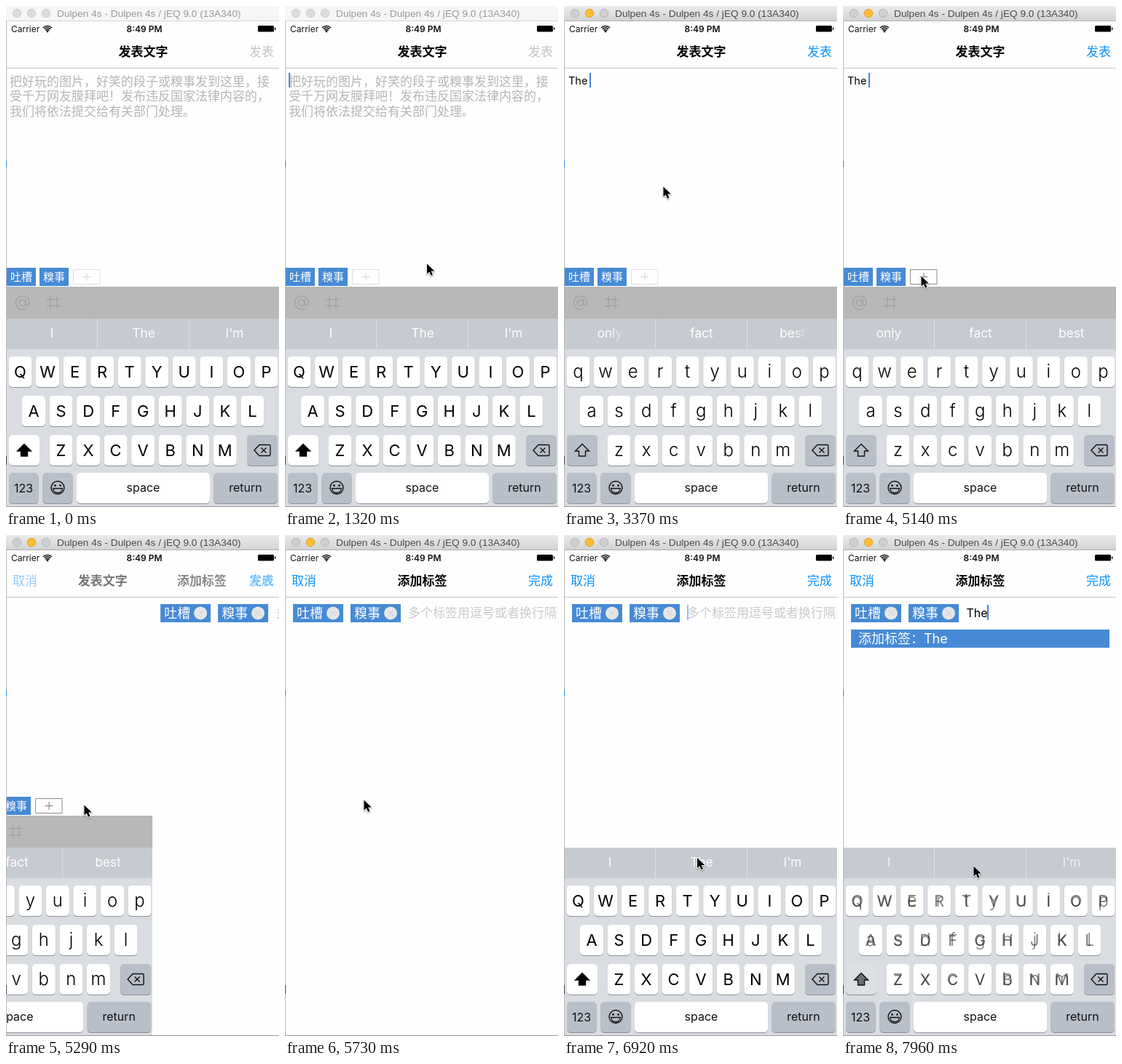
Recreate the animation shown at these times as an HTML page with a canvas. Size 375 px wide and 689 px high, loop 8 s.

```html
<!DOCTYPE html>
<html lang="zh-CN">
<head>
<meta charset="utf-8">
<title>发表文字</title>
<style>
  html, body { margin: 0; width: 100%; height: 100%; overflow: hidden; background: #fff; }
  canvas { display: block; width: 375px; height: 689px; }
</style>
</head>
<body>
<canvas id="stage"></canvas>
<script>
const W = 375, H = 689, LOOP = 8000, TICK = 147.2;
const BLUE = '#468ad5', LINK = '#0b92fb', SPECIAL = '#b9bfc9';
const canvas = document.getElementById('stage');
const ctx = canvas.getContext('2d');
const dpr = window.devicePixelRatio || 1;
canvas.width = W * dpr;
canvas.height = H * dpr;

const FOCUS = 20, TYPE = 21, PRESS = 35, PUSHED = 39, RAISE = 40, TAP = 53, TYPE_TAG = 54;

const pointerPath = [
  [7, 212, 215], [8, 205, 300], [10, 184, 408], [12, 184, 495], [14, 185, 490],
  [17, 185, 451], [20, 185, 451], [23, 136, 248], [25, 156, 262], [27, 162, 300],
  [32, 107, 371], [36, 107, 371], [38, 108, 364], [39, 108, 364], [40, 190, 160],
  [41, 228, 122], [42, 232, 120], [43, 232, 120], [46, 186, 420], [48, 179, 467],
  [49, 179, 467], [51, 179, 455], [55, 179, 455]
];

const clamp = v => Math.max(0, Math.min(1, v));
const easeOut = (v, power) => 1 - (1 - clamp(v)) ** power;

function rect(x, y, w, h, color) {
  ctx.fillStyle = color;
  ctx.fillRect(x, y, w, h);
}

function text(str, x, y, size, color, align = 'left', weight = 400) {
  ctx.font = `${weight} ${size}px Inter, "Noto Sans CJK SC", "Noto Sans CJK", sans-serif`;
  ctx.textAlign = align;
  ctx.fillStyle = color;
  ctx.fillText(str, x, y);
}

function circle(x, y, r, fill, stroke) {
  ctx.beginPath();
  ctx.arc(x, y, r, 0, 7);
  if (fill) { ctx.fillStyle = fill; ctx.fill(); }
  if (stroke) { ctx.strokeStyle = stroke; ctx.stroke(); }
}

function strokePath(d, color, width = 1) {
  ctx.strokeStyle = color;
  ctx.lineWidth = width;
  ctx.stroke(new Path2D(d));
}

function shifted(dx, dy, draw) {
  ctx.save();
  ctx.translate(dx, dy);
  draw();
  ctx.restore();
}

function faded(alpha, draw) {
  ctx.save();
  ctx.globalAlpha *= alpha;
  draw();
  ctx.restore();
}

function blink(time, start) {
  const phase = (((time - start) % 1000) + 1000) % 1000;
  return phase < 500 ? clamp((500 - phase) / 150) : clamp((phase - 870) / 100);
}

function caret(x, y, h, alpha) {
  faded(alpha, () => rect(x, y, 2, h, '#4a7fe0'));
}

function titleBar(active) {
  const fill = ctx.createLinearGradient(0, 0, 0, 20);
  fill.addColorStop(0, active ? '#ebebeb' : '#f6f6f6');
  fill.addColorStop(1, active ? '#d3d3d3' : '#f6f6f6');
  rect(0, 0, W, 20, fill);
  rect(0, 20, W, 1, active ? '#b1b1b1' : '#d4d4d4');
  ctx.lineWidth = 1;
  [15, 35, 55].forEach((x, i) => {
    const amber = active && i === 1;
    circle(x, 10, 5.7, amber ? '#fdbd34' : active ? '#cfcfcf' : '#dcdcdc',
      amber ? '#e0a02a' : active ? '#b8b8b8' : '#cdcdcd');
  });
  ctx.font = '13.7px "Liberation Sans", sans-serif';
  ctx.textAlign = 'left';
  ctx.fillStyle = active ? '#4b4b4b' : '#999';
  ctx.fillText('Dulpen 4s - Dulpen 4s / jEQ 9.0 (13A340)', 70, 15);
}

function statusBar() {
  text('Carrier', 7, 35.5, 12, '#111');
  text('8:49 PM', 190, 35.5, 12, '#111', 'center', 600);
  ctx.strokeStyle = '#111';
  ctx.lineWidth = 1.7;
  for (const r of [3.5, 6, 8.5]) {
    ctx.beginPath();
    ctx.arc(57, 36, r, -Math.PI * 0.75, -Math.PI * 0.25);
    ctx.stroke();
  }
  circle(57, 35, 1.4, '#111');
  ctx.fillStyle = '#000';
  ctx.beginPath();
  ctx.roundRect(346, 27, 22, 8.5, 1.5);
  ctx.fill();
  rect(369, 29.5, 1.3, 3.5, '#000');
}

function navBar(push, canPublish) {
  rect(0, 21, W, 64, '#fefefe');
  rect(0, 85, W, 1, '#c4c4c4');
  statusBar();
  faded(1 - push, () => {
    text('发表文字', 188.5 - 120 * push, 69, 17, '#000', 'center', 600);
    text('发表', 368, 69, 17, canPublish ? LINK : '#c3c3c5', 'right', 500);
  });
  faded(push, () => {
    text('添加标签', 188.5 + 150 * (1 - push), 69, 17, '#000', 'center', 600);
    text('取消', 9, 69, 17, LINK, 'left', 500);
    text('完成', 368, 69, 17, LINK, 'right', 500);
  });
}

function composePage(n, time) {
  rect(0, 86, W, 603, '#fefefe');
  if (n < TYPE) {
    ['把好玩的图片，好笑的段子或糗事发到这里，接',
     '受千万网友膜拜吧！发布违反国家法律内容的，',
     '我们将依法提交给有关部门处理。'
    ].forEach((line, i) => text(line, 5, 110 + i * 20.4, 17, '#b5b5b5'));
    caret(5, 92, 20, blink(time, 130));
  } else {
    text('The', 6, 108, 14.5, '#000');
    caret(35, 92, 20, n < 25 ? 1 : blink(time, 3800));
  }
  ['吐槽', '糗事'].forEach((tag, i) => {
    rect(1 + i * 45, 360, 40, 25, BLUE);
    text(tag, 6 + i * 45, 378, 15, '#fff');
  });
  const pressed = n >= PRESS;
  strokePath('M92.5 362.5h36.5v20h-36.5z', pressed ? '#8c8c8c' : '#dedede');
  strokePath('M105.5 372.5h11M111 367v11', pressed ? '#777' : '#d2d2d2');
  toolBar();
}

function toolBar() {
  rect(0, 386, W, 44, '#b8b8b8');
  const ink = '#a1a1a1';
  ctx.lineWidth = 1.3;
  circle(22.5, 408, 4.2, null, ink);
  strokePath('M27 403.5v6.5c0 3 5 3 5-2a9.3 9.3 0 1 0-4 7.8', ink, 1.3);
  strokePath('M61 399v18M70 399v18M56 403.5h18.5M56 412.5h18.5', ink, 1.3);
}

function tagPage(n, time) {
  rect(0, 86, W, 603, '#fefefe');
  ['吐槽', '糗事'].forEach((tag, i) => {
    const x = 11 + i * 79;
    rect(x, 95, 69, 25, BLUE);
    text(tag, x + 5, 114, 18, '#fff');
    circle(x + 55, 107.5, 9, '#e6e6e6');
    strokePath(`M${x + 51.5} 104l7 7m0-7l-7 7`, '#d3d8de', 1.2);
  });
  if (n < TYPE_TAG) {
    text('多个标签用逗号或者换行隔开', 169, 113, 17, '#c9c9ce');
    if (n > RAISE) caret(169, 96, 21, blink(time, 6000));
  } else {
    text('The', 169.5, 113, 16, '#000');
    caret(198, 96, 21, 1);
    rect(11, 130, 355, 25, BLUE);
    text('添加标签：The', 21, 149, 18, '#fff');
  }
}

function key(x, y, w, color, capsAlpha = 0) {
  const shape = (dy, fill) => {
    ctx.fillStyle = fill;
    ctx.beginPath();
    ctx.roundRect(x, y + dy, w, 42, 5);
    ctx.fill();
  };
  shape(1, '#8d9095');
  shape(0, color);
  if (capsAlpha) faded(capsAlpha, () => shape(0, '#fff'));
}

function suggestion(word, i, reveal, alpha) {
  const x = [63, 189, 314][i];
  const edge = clamp(reveal * (i === 1 ? 2 : 1));
  const fill = ctx.createLinearGradient(x - 20, 0, x + 20, 0);
  fill.addColorStop(edge, '#fff');
  fill.addColorStop(Math.min(1, edge + 0.5), edge < 1 ? '#fff0' : '#fff');
  faded(alpha, () => text(word, x, 456, 17.3, fill, 'center'));
}

function keyboard({ caps, words, reveal, alpha }) {
  rect(0, 430, W, 42, '#c6cad1');
  rect(0, 472, W, 217, '#d9dce1');
  rect(125, 430, 1, 42, '#dde0e4');
  rect(251, 430, 1, 42, '#dde0e4');
  words.forEach((word, i) => suggestion(word, i, reveal, alpha));

  [['QWERTYUIOP', 3.5, 482], ['ASDFGHJKL', 22, 536], ['ZXCVBNM', 59.5, 590]].forEach(([row, left, y]) => {
    [...row].forEach((letter, i) => {
      const x = left + i * 37.55;
      key(x, y, 32, '#fff');
      faded(caps, () => text(letter, x + 16, y + 29.3, 22, '#000', 'center'));
      faded(1 - caps, () => text(letter.toLowerCase(), x + 16, y + 28.5, 24, '#000', 'center', 300));
    });
  });

  key(4, 590, 42, SPECIAL, caps);
  const arrow = 'M25 602.5l9.5 9.5h-5v7h-9v-7h-5z';
  strokePath(arrow, '#111', 1.4);
  faded(caps, () => { ctx.fillStyle = '#000'; ctx.fill(new Path2D(arrow)); });

  key(331, 590, 42, SPECIAL);
  strokePath('M341 611l7-7.5h13.5q1.5 0 1.5 1.5v12q0 1.5-1.5 1.5h-13.5zM350.5 607.5l7 7m0-7l-7 7', '#111', 1.4);

  key(4, 642, 40.5, SPECIAL);
  key(50.5, 642, 41, SPECIAL);
  key(97, 642, 183, '#fff');
  key(285.5, 642, 87.5, SPECIAL);
  text('123', 24, 668.5, 16, '#111', 'center');
  text('space', 188.5, 668, 16, '#111', 'center');
  text('return', 329, 668, 16, '#111', 'center');

  ctx.lineWidth = 1.4;
  circle(71, 662.5, 9, null, '#111');
  circle(67.5, 659.5, 1.4, '#111');
  circle(74.5, 659.5, 1.4, '#111');
  strokePath('M64.5 663.5h13q-1 6-6.5 6t-6.5-6z', '#111', 1.3);
}

function keyboardState(n) {
  const capitals = { caps: 1, words: ['I', 'The', "I'm"], reveal: 1, alpha: 1 };
  if (n === FOCUS || n === TAP) return { ...capitals, words: ['I', '', "I'm"] };
  if (n === TYPE || n === TYPE_TAG) return { caps: 0.5, words: ['I', '', "I'm"], reveal: 1, alpha: 0.7 };
  if (n < FOCUS || n >= PUSHED) return capitals;
  return { caps: 0, words: ['only', 'fact', 'best'], reveal: 0.55 + (n - 23) * 0.45, alpha: 1 };
}

function pointer(n) {
  const next = pointerPath.findIndex(p => p[0] > n);
  if (next < 1) return;
  const [t0, x0, y0] = pointerPath[next - 1], [t1, x1, y1] = pointerPath[next];
  const k = (n - t0) / (t1 - t0);
  shifted(x0 + (x1 - x0) * k, y0 + (y1 - y0) * k, () => {
    const shape = new Path2D('M.5 .5v14l3.3-3 2.3 5.3 2.4-1-2.3-5.2h4.6z');
    ctx.lineJoin = 'round';
    ctx.shadowColor = '#0006';
    ctx.shadowBlur = 2 * dpr;
    ctx.shadowOffsetY = dpr;
    ctx.strokeStyle = '#fff';
    ctx.lineWidth = 1.8;
    ctx.stroke(shape);
    ctx.shadowColor = 'transparent';
    ctx.fillStyle = '#000';
    ctx.fill(shape);
  });
}

function windowEdges() {
  rect(0, 21, 1, 668, '#b9b9b9');
  rect(0, 213, 1, 9, '#2490ee');
  rect(0, 619, 1, 12, '#444');
  rect(0, 688, W, 1, '#999');
}

function draw(time) {
  const n = Math.floor((time + 20) / TICK);
  const push = n >= PUSHED ? 1 : easeOut((n - PRESS - 0.4) / 3.2, 3);

  ctx.setTransform(dpr, 0, 0, dpr, 0, 0);
  rect(0, 0, W, H, '#fefefe');
  if (push < 1) {
    shifted(-112 * push, 0, () => composePage(n, time));
    shifted(-W * push, 0, () => keyboard(keyboardState(n)));
  }
  if (push > 0) shifted(W * (1 - push), 0, () => tagPage(n, time));
  if (n > RAISE) {
    const drop = 259 * (1 - easeOut((n - RAISE) / 3, 4));
    shifted(0, drop, () => keyboard(keyboardState(n)));
  }
  navBar(push, n >= TYPE);
  titleBar(n >= FOCUS);
  windowEdges();
  pointer(n);
}

function loop() {
  draw(performance.now() % LOOP);
  requestAnimationFrame(loop);
}
loop();
</script>
</body>
</html>
```
